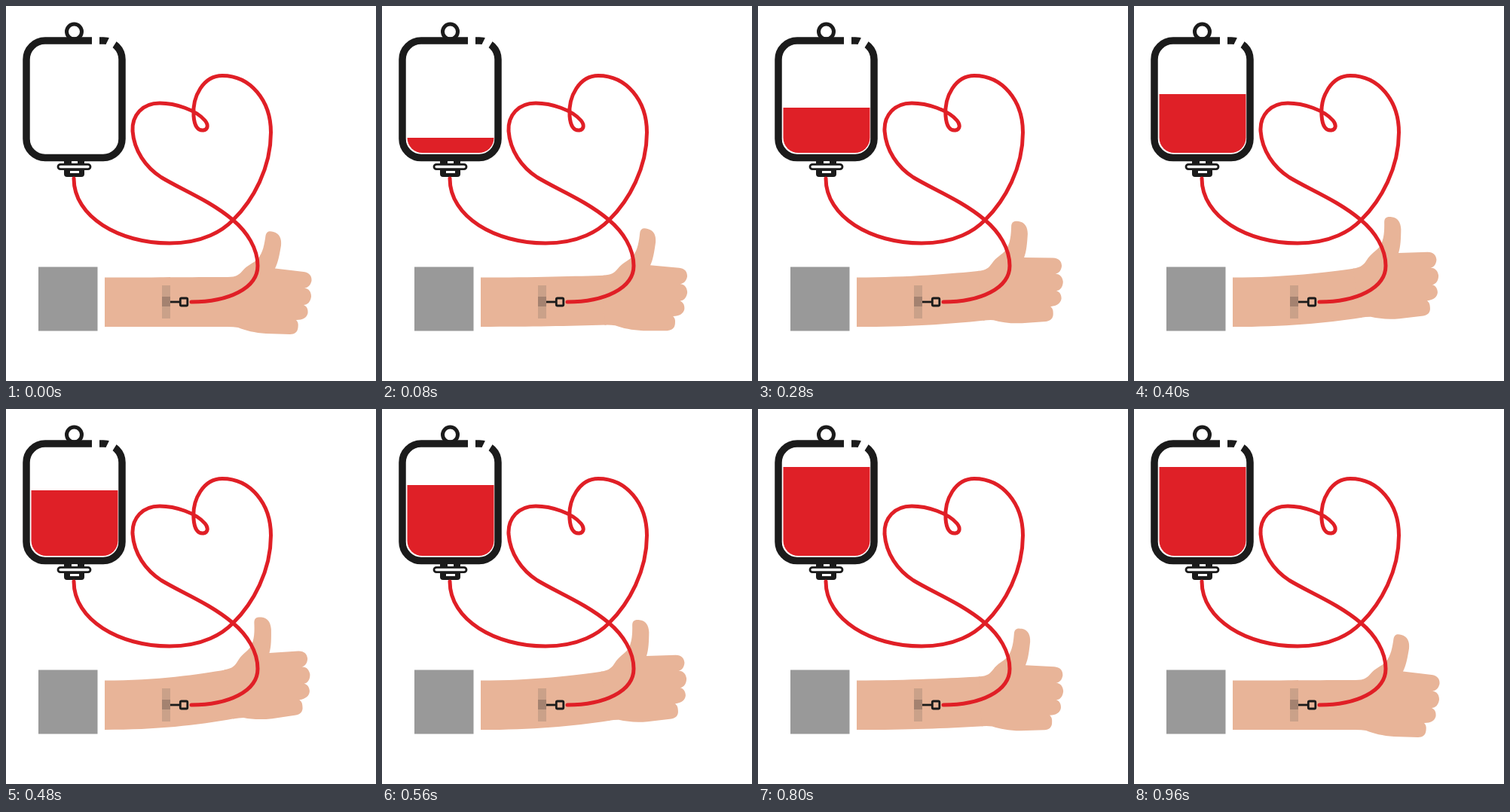
These frames come from a looping animation (491x498 px, 1 s). An HTML page:

```html
<!DOCTYPE html>
<html lang="en">
<head>
<meta charset="utf-8">
<title>Blood donation</title>
<style>
  html, body { margin: 0; width: 100%; height: 100%; overflow: hidden; background: #fff; }
  svg { display: block; width: 100%; height: 100%; }
</style>
</head>
<body>
<svg viewBox="0 0 491 498">
  <clipPath id="inside"><rect x="33.500" y="52" width="115" height="143" rx="20"/></clipPath>

  <!-- bag -->
  <rect id="blood" x="33" width="116" height="150" fill="#df2027" clip-path="url(#inside)"/>
  <g fill="none" stroke="#1b1b1b">
    <rect x="27" y="46" width="127" height="155.5" rx="25" stroke-width="9.5"/>
    <circle cx="90.5" cy="34" r="10" stroke-width="5"/>
  </g>
  <path d="M114 40h10v12h-10zM138 40L148 45 141 56 132 52Z" fill="#fff"/>
  <path d="M77 203h27v20q0 4-4 4h-19q-4 0-4-4z" fill="#1b1b1b"/>
  <path d="M87 206h8v4h-8zM85 219h12v3h-12z" fill="#fff"/>
  <rect x="69" y="210.3" width="43" height="6.4" rx="3.2" fill="#fff" stroke="#1b1b1b" stroke-width="2.8"/>

  <!-- arm -->
  <rect x="43" y="346.5" width="78.5" height="85" fill="#999"/>
  <g fill="#e8b498">
    <path id="forearm"/>
    <path id="hand" d="M294 360C306 360 309 357 314 351.500C320 344 328 342 334 336C341 328 343 316 344.500 305
      C346 298 351 299 355 300C363 302 366 309 365 318C363 330 361 341 357 348.500L395 353
      C403 354 406 359 405.500 365C404 371 401 374 396 374.500C402 375 405 380 405 386
      C404 393 400 397 395 397C400 399 401 404 400.500 408C399 414 394 417 385 417
      C388 420 388 423 387.500 427C387 433 383 436 377 436L345 435C330 434 318 431 308 427Q302 426 294 426Z"/>
  </g>
  <path d="M207 371h11v44h-11z" fill="#caa189"/>
  <path d="M207 386h11v13h-11z" fill="#a48270"/>
  <g fill="none" stroke="#1b1b1b" stroke-width="2.800">
    <path d="M218 393h12"/>
    <rect x="231.300" y="388" width="9.500" height="10" rx="1.500"/>
  </g>

  <!-- tube -->
  <path fill="none" stroke="#e01f26" stroke-width="5" stroke-linecap="round" d="M90 229
    C90 280 150 315 217 315C262 315 288 298 301.500 284C328 258 351.500 215 351.500 168
    C351.500 125 324 92.500 287 92.500C262 92.500 247 120 249 146C250 160 255 166 262 165C268 164 269 158 264 152
    C252 138 225 129 204 129C181 129 167 145 168 166C170 192 185 214 206 227.500
    C235 245 270 258 301 284C320 300 334 322 334 345C334 375 295 393 246 393"/>
</svg>
<script>
const blood = document.getElementById('blood');
const forearm = document.getElementById('forearm');
const hand = document.getElementById('hand');
const pivot = [217, 378];

function turn(x, y, deg) {
  const a = deg * Math.PI / 180, c = Math.cos(a), s = Math.sin(a);
  const dx = x - pivot[0], dy = y - pivot[1];
  return [pivot[0] + dx * c + dy * s, pivot[1] - dx * s + dy * c];
}

// Fast at first, then a steady rise until the bag is full.
function level(n) {
  const y = n < 12.4 ? 195 - 10.27 * n + 0.25 * n * n : 107 - 4 * (n - 12.4);
  return Math.max(77, Math.round(y));
}

function draw(now) {
  const n = Math.floor(now % 1000 / 40);
  const deg = 0.86 * (12 - Math.abs(n - 12));
  const at = (x, y) => turn(x, y, deg).join(' ');
  blood.setAttribute('y', level(n));
  hand.setAttribute('transform', `rotate(${-deg} ${pivot})`);
  forearm.setAttribute('d', `M131 360.5C200 360.5 ${at(262, 360)} ${at(296, 360)}
    L${at(304, 393)}L${at(296, 426)}C${at(245, 426)} 200 426 131 426Z`);
  requestAnimationFrame(draw);
}
draw(performance.now());
</script>
</body>
</html>
```
